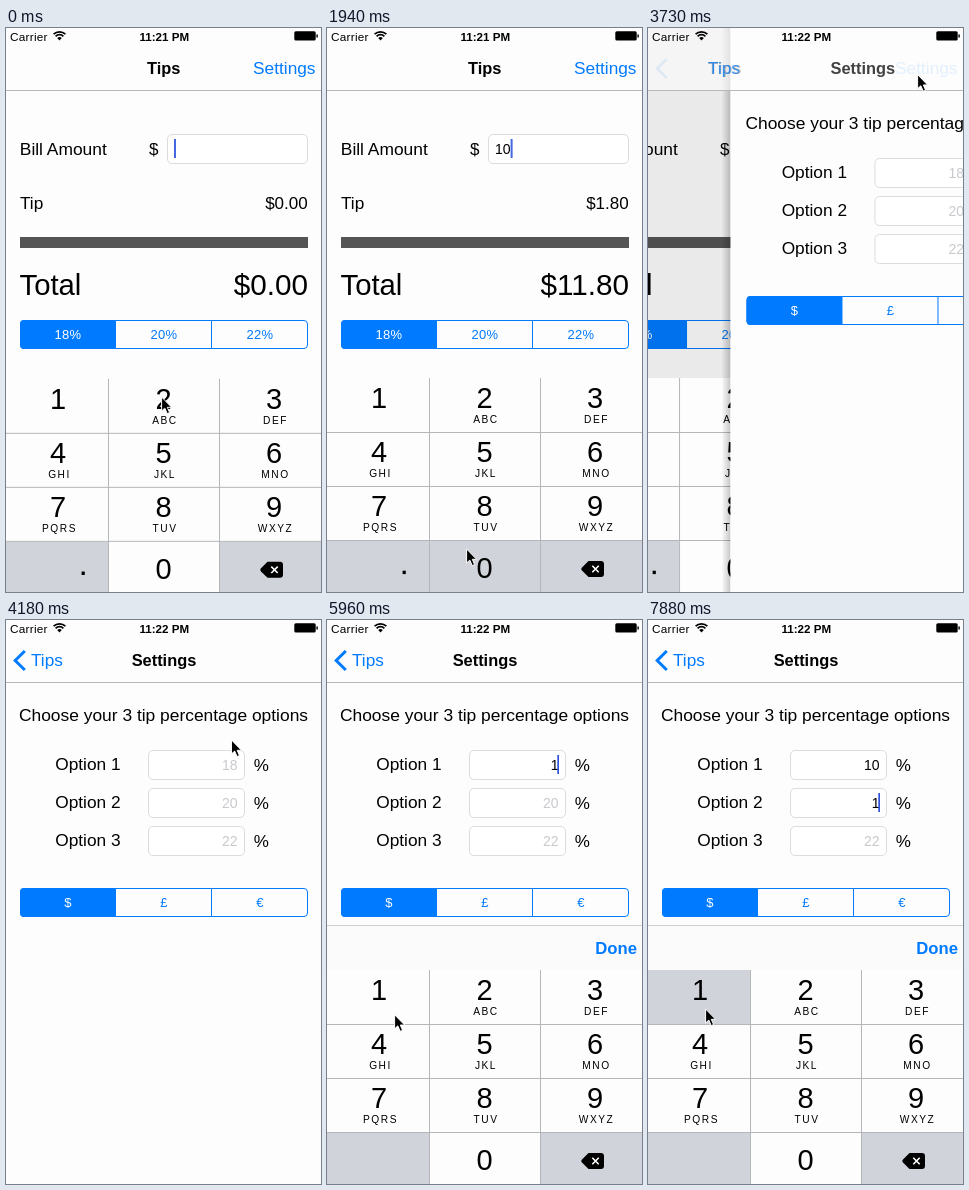
Animation, 315 px wide and 564 px high, one loop 8000 ms. Source, as an HTML page:

```html
<!DOCTYPE html>
<html lang="en">
<head>
<meta charset="utf-8">
<title>Tip calculator</title>
<style>
  html, body { margin: 0; width: 100%; height: 100%; overflow: hidden; background: #fdfdfd; }
  svg { display: block; width: 100vw; height: 100vh; }
  text { font-family: "Liberation Sans", Arial, sans-serif; white-space: pre; }
</style>
</head>
<body>
<svg id="stage" viewBox="0 0 315 564">
  <defs>
    <linearGradient id="edge">
      <stop offset="0" stop-color="#000" stop-opacity="0"/>
      <stop offset="1" stop-color="#000" stop-opacity=".22"/>
    </linearGradient>
  </defs>
</svg>
<script>
const BLUE = '#007aff', GREY = '#d0d3da', PAPER = '#fdfdfd', LINE = '#b4b6ba', INK = '#000';
const LOOP = 8000, TICK = 148.6, LAST = 53, WIDTH = 315;
const stage = document.getElementById('stage');

function el(parent, tag, attrs = {}) {
  const node = document.createElementNS('http://www.w3.org/2000/svg', tag);
  set(node, attrs);
  return parent.appendChild(node);
}
function set(node, attrs) {
  for (const k in attrs) node.setAttribute(k, attrs[k]);
}
const group = parent => el(parent, 'g');
const box = (parent, x, y, width, height, fill, more = {}) =>
  el(parent, 'rect', { x, y, width, height, fill, ...more });
const path = (parent, d, more = {}) => el(parent, 'path', { d, ...more });
function label(parent, str, x, y, size, more = {}) {
  const node = el(parent, 'text', { x, y, 'font-size': size, fill: INK, ...more });
  node.textContent = str;
  return node;
}
const MID = { 'text-anchor': 'middle' }, END = { 'text-anchor': 'end' }, BOLD = { 'font-weight': 700 };
const move = (node, x, y = 0) => set(node, { transform: `translate(${x} ${y})` });
const fade = (node, opacity) => set(node, { opacity });

function field(parent, x, y, w) {
  box(parent, x + .5, y + .5, w - 1, 29, '#fff', { rx: 4.5, stroke: '#dcdcdc' });
}

function segments(parent, y, names) {
  box(parent, 14.5, y + .5, 287, 28, PAPER, { rx: 3.5, stroke: BLUE });
  path(parent, `M110 ${y}H18a4 4 0 0 0-4 4v21a4 4 0 0 0 4 4H110Z`, { fill: BLUE });
  box(parent, 205, y, 1, 29, BLUE);
  names.forEach((name, i) =>
    label(parent, name, 62 + i * 96, y + 19.3, 13, { ...MID, fill: i ? BLUE : '#fff', 'letter-spacing': .3 }));
}

function keypad(parent, withDot) {
  const g = group(parent), cols = [52, 157.5, 268];
  const names = ['', 'ABC', 'DEF', 'GHI', 'JKL', 'MNO', 'PQRS', 'TUV', 'WXYZ'];
  box(g, 0, 350, WIDTH, 216, PAPER);
  box(g, 0, 513, 102, 53, GREY);
  box(g, 214, 513, 101, 53, GREY);
  const down = {
    1: box(g, 0, 350, 102, 54, GREY),
    0: box(g, 103, 513, 110, 53, GREY)
  };
  for (const y of [404, 458, 512]) box(g, 0, y, WIDTH, 1, LINE);
  for (const x of [102, 213]) box(g, x, 350, 1, 216, LINE);
  names.forEach((name, i) => {
    const x = cols[i % 3], y = 379.7 + 54 * Math.floor(i / 3);
    label(g, i + 1, x, y, 29, MID);
    label(g, name, x + 1.5, y + 15.2, 10.2, { ...MID, 'letter-spacing': 1.5 });
  });
  label(g, '0', cols[1], 549.8, 29, MID);
  if (withDot) box(g, 75.6, 542.7, 3.2, 3.4, INK);
  path(g, 'M261.5 533H274a3 3 0 0 1 3 3v10a3 3 0 0 1-3 3H261.5L255 542.6q-1.4-1.6 0-3.2Z', { fill: INK });
  path(g, 'M265.3 537.8l6.4 6.4m0-6.4l-6.4 6.4', { stroke: '#fff', 'stroke-width': 1.6 });
  return { g, down };
}

// Calculator screen
const home = group(stage);
box(home, 0, 0, WIDTH, 564, PAPER);
label(home, 'Bill Amount', 13.8, 126.5, 17.4);
label(home, '$', 143, 126.5, 17);
field(home, 161, 106, 141);
const amount = label(home, '', 168, 126, 14);
const amountCaret = box(home, 168, 111, 2, 19, '#4468e0');
label(home, 'Tip', 14, 180.5, 17.2);
const tip = label(home, '', 301.7, 180.5, 17, END);
box(home, 14, 209, 288, 11, '#555');
label(home, 'Total', 13.5, 267, 29.3);
const total = label(home, '', 302, 267, 29.7, END);
segments(home, 292, ['18%', '20%', '22%']);
const shade = box(stage, 0, 0, WIDTH, 564, '#000');
const homePad = keypad(stage, true);

// Settings screen
const prefs = group(stage);
box(prefs, -11, 0, 9, 564, 'url(#edge)');
box(prefs, -2, 0, WIDTH + 2, 564, PAPER);
label(prefs, 'Choose your 3 tip percentage options', 157.5, 101, 17.4, MID);
const options = ['18', '20', '22'].map((hint, i) => {
  const y = 130 + i * 38;
  label(prefs, 'Option ' + (i + 1), 49.2, y + 20, 17.3);
  field(prefs, 142, y, 97);
  label(prefs, '%', 247.8, y + 21, 17);
  return { hint, node: label(prefs, hint, 231.5, y + 20, 14, END) };
});
const optionCaret = box(prefs, 230.3, 135, 1.7, 19, '#2f52dc');
segments(prefs, 268, ['$', '£', '€']);
const prefsBoard = group(stage);
box(prefsBoard, 0, 305, WIDTH, 46, '#fbfbfc');
box(prefsBoard, 0, 305, WIDTH, 1, '#cfcfd2');
label(prefsBoard, 'Done', 310, 334, 16.7, { ...END, ...BOLD, fill: BLUE });
const prefsPad = keypad(prefsBoard, false);

// Navigation and status bars
box(stage, 0, 0, WIDTH, 62, PAPER, { opacity: .6 });
box(stage, 0, 62, WIDTH, 1, '#b8b8ba');
const homeTitle = label(stage, 'Tips', 0, 46.3, 16.4, BOLD);
const back = label(stage, 'Tips', 0, 46.3, 17.2, { fill: BLUE });
const prefsTitle = label(stage, 'Settings', 0, 46.3, 16.4, { ...MID, ...BOLD });
const prefsButton = label(stage, 'Settings', 309.5, 46.3, 17.3, { ...END, fill: BLUE });
const chevron = path(stage, 'M18.8 31L9.2 40.5L18.8 50', { fill: 'none', stroke: BLUE, 'stroke-width': 3 });
label(stage, 'Carrier', 4, 12.6, 11.8, { 'letter-spacing': .25 });
const clock = label(stage, '', 158.3, 12.6, 11.6, { ...MID, ...BOLD });
path(stage, 'M53.5 12.4L51.2 10.1a3.2 3.2 0 0 1 4.6 0Z', { fill: INK });
path(stage, 'M49.6 8.3a5.5 5.5 0 0 1 7.8 0M47.6 6.2a8.4 8.4 0 0 1 11.8 0',
  { fill: 'none', stroke: INK, 'stroke-width': 1.7 });
box(stage, 288.3, 3.3, 21.4, 9.2, INK, { rx: 1.5 });
box(stage, 310.4, 6.3, 1.4, 3.4, INK, { rx: .7 });

// Pointer, tip near the group's origin
const pointer = group(stage);
const ring = el(pointer, 'circle', { cx: 1, cy: 0, r: 10, fill: '#fff', 'fill-opacity': .35, stroke: '#333' });
path(pointer, 'M.6 0V14L3.8 11.1L6.2 16.6L8.6 15.6L6.3 10.3H10.6Z',
  { fill: INK, stroke: '#fff', 'stroke-width': 1, 'stroke-linejoin': 'round' });

// Taps, timed in ticks: a tap focuses a field (0 is the bill) and may type a digit into it
const taps = [
  { at: -1, x: 155, y: 369, field: 0 },
  { at: 8, x: 74, y: 363, field: 0, key: '1' },
  { at: 12, x: 139, y: 521, field: 0, key: '0' },
  { at: 14, x: 139, y: 521, field: 0, key: '0' },
  { at: 23, x: 270, y: 45 },
  { at: 30, x: 217, y: 133, field: 1 },
  { at: 38, x: 62, y: 386, field: 1, key: '1' },
  { at: 43, x: 142, y: 526, field: 1, key: '0' },
  { at: 48, x: 207, y: 185, field: 2 },
  { at: 52, x: 57, y: 389, field: 2, key: '1' }
];
const PUSH = 23.87, PUSH_TIME = 3.13, RISE_TIME = 2.7, GLIDE = 6, BLINK = 7;

const clamp = v => Math.min(1, Math.max(0, v));
const easeOut = u => 1 - (1 - clamp(u)) ** 3;
const easeInOut = u => u < .5 ? 4 * u ** 3 : 1 - 4 * (1 - u) ** 3;
const drop = (n, start) => 260 * (1 - easeOut((n - start) / RISE_TIME));
const typed = (n, id) => taps.filter(t => t.field === id && t.key && t.at < n).map(t => t.key).join('');

// The pointer rests one tick after a tap, then glides so as to arrive with the next
function pointerAt(n) {
  const i = taps.findIndex(t => t.at >= n);
  if (i < 0) return taps[taps.length - 1];
  const a = taps[i - 1], b = taps[i];
  const start = Math.max(a.at + 1, b.at - GLIDE);
  const u = easeInOut(clamp((n - start) / (b.at - start)));
  return { x: a.x + (b.x - a.x) * u, y: a.y + (b.y - a.y) * u };
}

function press(pad, tap, active) {
  for (const key in pad.down) fade(pad.down[key], active && tap && tap.key === key ? 1 : 0);
}

function draw(n) {
  const p = easeOut((n - PUSH) / PUSH_TIME), rest = 1 - p;
  const focus = taps.filter(t => t.field !== undefined && t.at < n).pop();
  const phase = 2 * Math.PI * (n - focus.at - 2.1) / BLINK;
  const caret = clamp(.5 + 1.1 * Math.cos(phase));
  const held = taps.find(t => n === t.at || n === t.at + 1);

  const bill = typed(n, 0);
  amount.textContent = bill;
  tip.textContent = '$' + (bill * .18).toFixed(2);
  total.textContent = '$' + (bill * 1.18).toFixed(2);
  set(amountCaret, { x: 168 + bill.length * 7.8, opacity: caret });

  move(home, -96 * p);
  move(homePad.g, -96 * p, drop(n, -2.3));
  press(homePad, held, n < PUSH);
  fade(shade, .1 * p);
  move(prefs, (WIDTH + 11) * rest - 3 * p * rest);
  set(prefs, { visibility: p ? 'visible' : 'hidden' });

  options.forEach(({ hint, node }, i) => {
    const text = typed(n, i + 1);
    node.textContent = text || hint;
    set(node, { fill: text ? INK : '#c9c9ce' });
  });
  set(optionCaret, { y: 97 + 38 * focus.field, opacity: focus.field ? caret : 0 });
  move(prefsBoard, 0, drop(n, 30.7));
  press(prefsPad, held, n > PUSH);

  const left = 25 + 116 * (1 - p ** 1.19);
  set(homeTitle, { x: left, opacity: rest });
  set(back, { x: left, opacity: p });
  set(prefsTitle, { x: 158 + 218 * rest, opacity: p });
  fade(prefsButton, n === 23 ? .3 : rest ** 1.7);
  fade(chevron, p ** 8);
  clock.textContent = n < 16 ? '11:21 PM' : '11:22 PM';

  const { x, y } = pointerAt(n);
  move(pointer, x, y);
  fade(ring, held && held.at === n ? 1 : 0);
}

const start = performance.now();
function frame() {
  const t = (performance.now() - start) % LOOP;
  draw(Math.min(LAST, Math.floor(t / TICK)));
  requestAnimationFrame(frame);
}
frame();
</script>
</body>
</html>
```
